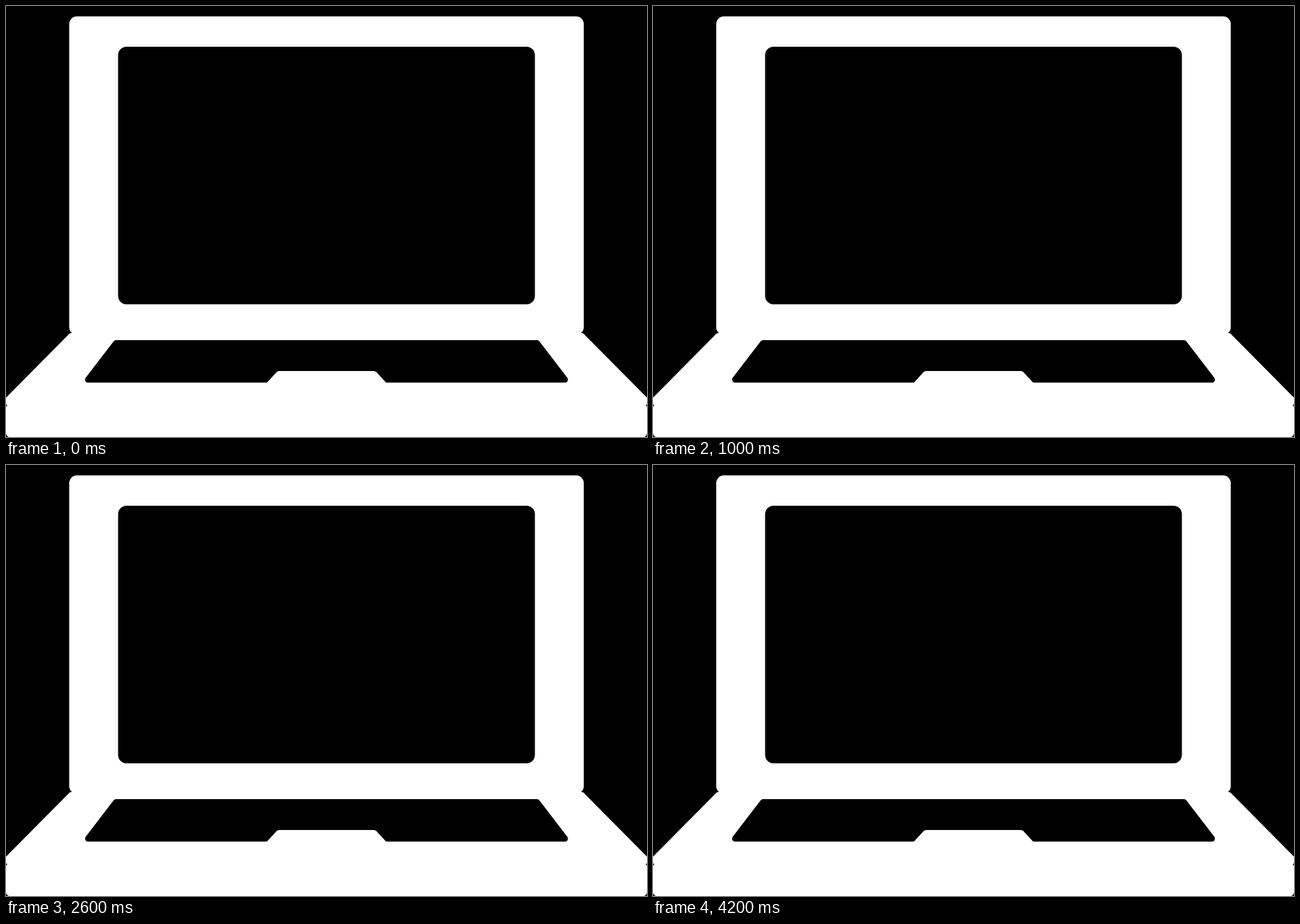
An HTML page with a canvas that plays this animation: 912 px wide and 614 px high, repeating every 5240 ms.

```html
<!DOCTYPE html>
<html lang="en">
<head>
<meta charset="utf-8">
<title>Laptop</title>
<style>
html, body { margin: 0; width: 100%; height: 100%; overflow: hidden; background: #000; }
canvas { display: block; }
</style>
</head>
<body>
<canvas id="stage" width="912" height="614"></canvas>
<script>
const canvas = document.getElementById('stage');
const ctx = canvas.getContext('2d');
const MID = canvas.width / 2;
const LOOP = 5240, HOP_EVERY = 1600, HOPS = 3, STEP = 40;
const BASE_START = 50, LID_START = 180, PEAK = 600, LAND = 1000, HEIGHT = 9.8;

// Both shapes are centred on the stage and given by half widths.
function box(half, top, bottom, radius, color) {
  ctx.beginPath();
  ctx.roundRect(MID - half, top, 2 * half, bottom - top, radius);
  ctx.fillStyle = color;
  ctx.fill();
}

function trapezoid(topHalf, top, bottomHalf, bottom, topRadius, bottomRadius, color) {
  ctx.beginPath();
  ctx.moveTo(MID, top);
  ctx.arcTo(MID + topHalf, top, MID + bottomHalf, bottom, topRadius);
  ctx.arcTo(MID + bottomHalf, bottom, MID, bottom, bottomRadius);
  ctx.arcTo(MID - bottomHalf, bottom, MID - topHalf, top, bottomRadius);
  ctx.arcTo(MID - topHalf, top, MID, top, topRadius);
  ctx.closePath();
  ctx.fillStyle = color;
  ctx.fill();
}

function drawLid() {
  box(366, 14.8, 468.5, 11, '#fff');
  box(296.5, 58.1, 424.9, 12, '#000');
}

function drawBase() {
  trapezoid(365, 466, MID, 558, 4, 0, '#fff');
  box(MID, 557.5, 569, [0, 0, 3, 3], '#fff');
  box(MID - 2, 566, 572, 0, '#fff');
  box(MID, 569, 614.3, [3, 3, 6, 6], '#fff');
  trapezoid(301.5, 476, 348, 536.6, 4, 4.4, '#000');
  trapezoid(69.5, 520, 93.5, 546, 5, 0, '#fff');
}

function ease(t, from, to) {
  const p = Math.min(1, Math.max(0, (t - from) / (to - from)));
  return (1 - Math.cos(Math.PI * p)) / 2;
}

// The lid rises later than the base and falls together with it.
function lifted(t, start, draw) {
  const rise = t < PEAK ? ease(t, start, PEAK) : 1 - ease(t, PEAK, LAND);
  ctx.save();
  ctx.translate(0, -HEIGHT * rise);
  draw();
  ctx.restore();
}

function frame(now) {
  const time = Math.floor((now % LOOP) / STEP) * STEP;
  const hop = Math.min(HOPS - 1, Math.floor(time / HOP_EVERY));
  const t = time - hop * HOP_EVERY;
  ctx.fillStyle = '#000';
  ctx.fillRect(0, 0, canvas.width, canvas.height);
  lifted(t, LID_START, drawLid);
  lifted(t, BASE_START, drawBase);
  requestAnimationFrame(frame);
}

frame(0);
</script>
</body>
</html>
```
